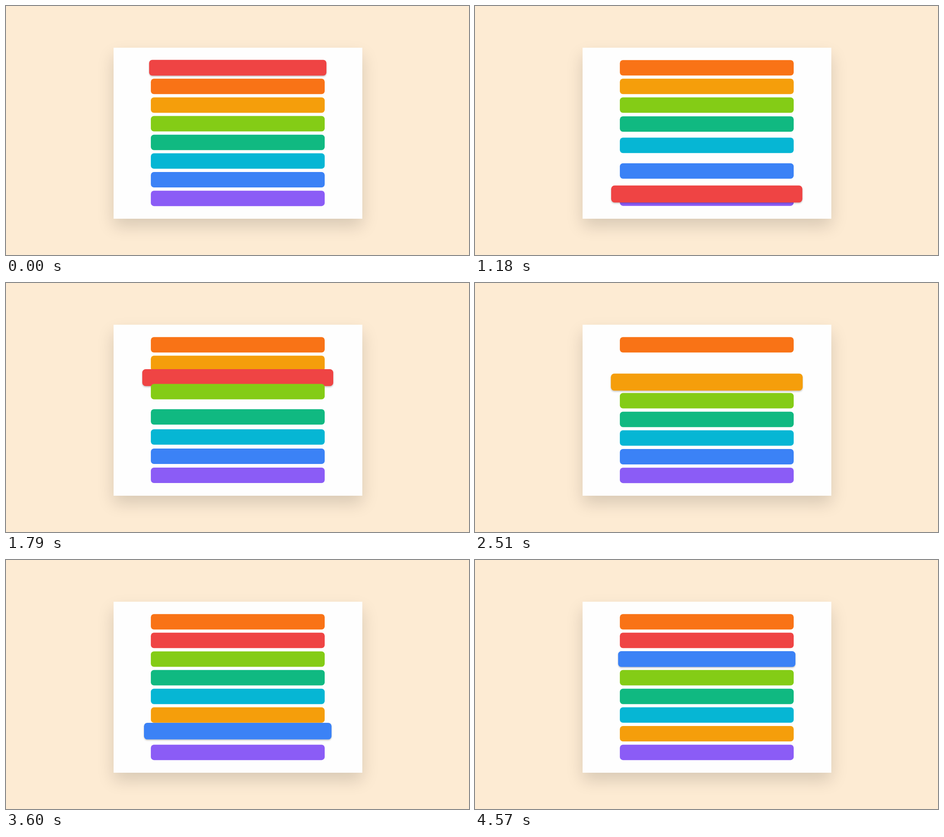
These frames come from a looping animation (1020 px wide and 549 px high, 4960 ms). An HTML page:

```html
<!DOCTYPE html>
<html lang="en">
<head>
<meta charset="utf-8">
<title>Reorder list</title>
<style>
  html, body { margin: 0; width: 100%; height: 100%; overflow: hidden; background: #fdebd3; }
  .card {
    position: absolute; left: 237px; top: 92px; width: 547.5px; height: 376.5px;
    background: #fefefe; box-shadow: 0 17.1px 34.3px rgba(0, 0, 0, .15);
  }
  .bar {
    position: absolute; left: 0; top: 0; width: 383.2px; height: 34.3px;
    border-radius: 6.9px;
  }
</style>
</head>
<body>
<div class="card"></div>
<script>
const LOOP = 4960, GLIDE = 450, HOVER_LEAD = 170;
const HOVER = .02, LIFT = .08;
const PITCH = 41.14, TOP = 136.3, CENTER_X = 510.7, BAR_W = 383.2, BAR_H = 34.3;
// A neighbour gives way once the held bar's edge passes its centre (in slots)
const SWAP_AT = 1 - BAR_H / PITCH / 2;
const COLORS = ['#ef4444', '#f97316', '#f59e0b', '#84cc16', '#10b981', '#06b6d4', '#3b82f6', '#8b5cf6'];

// path: key points of the pointer as [time, slot]
const drags = [
  { bar: 0, grab: 265, release: 1783, path: [
    [300, 0], [520, .58], [700, 2.01], [815, 3.6], [946, 4.58], [1180, 6.76],
    [1260, 7], [1340, 7], [1437, 5.42], [1544, 3.42], [1783, 1.76]] },
  { bar: 2, grab: 2370, release: 3040, path: [
    [2390, 1], [2510, 1.99], [2640, 3.58], [2860, 5.4]] },
  { bar: 6, grab: 3519, release: 3980, path: [
    [3540, 6], [3600, 5.865], [3705, 4.42], [3845, 2.42], [3950, 1.44]] }
];

// Underdamped unit step: stiffness 550, damping 30
function springStep(ms) {
  if (ms <= 0) return 0;
  const t = ms / 1000, decay = 15, freq = Math.sqrt(550 - decay * decay);
  return 1 - Math.exp(-decay * t) * (Math.cos(freq * t) + decay / freq * Math.sin(freq * t));
}

// Overdamped return: stiffness 200, damping 40; rests within 1px
function settle(offset, ms) {
  const t = ms / 1000, root = Math.sqrt(200), slow = 20 - root, fast = 20 + root;
  const left = offset * (fast * Math.exp(-slow * t) - slow * Math.exp(-fast * t)) / (fast - slow);
  return Math.abs(left) * PITCH < 1 ? 0 : left;
}

// cubic-bezier(.4, 0, .1, 1)
function ease(x) {
  if (x >= 1) return 1;
  let lo = 0, hi = 1;
  for (let i = 0; i < 24; i++) {
    const s = (lo + hi) / 2, r = 1 - s;
    if (1.2 * r * r * s + .3 * r * s * s + s ** 3 < x) lo = s; else hi = s;
  }
  return lo * lo * (3 - 2 * lo);
}

// Monotone cubic interpolation through the key points
function along(path, time) {
  const last = path.length - 1;
  const t = Math.max(path[0][0], Math.min(path[last][0], time));
  let i = 0;
  while (i < last - 1 && t >= path[i + 1][0]) i++;
  const secant = k => (path[k + 1][1] - path[k][1]) / (path[k + 1][0] - path[k][0]);
  const slope = k => {
    if (k === 0 || k === last) return 0;
    const a = secant(k - 1), b = secant(k);
    return a * b > 0 ? 2 * a * b / (a + b) : 0;
  };
  const [t0, y0] = path[i], [t1, y1] = path[i + 1];
  const h = t1 - t0, u = (t - t0) / h, v = 1 - u;
  return y0 * v * v * (1 + 2 * u) + y1 * u * u * (3 - 2 * u)
    + h * (slope(i) * u * v * v - slope(i + 1) * u * u * v);
}

const moves = COLORS.map((_, slot) => [{ at: -LOOP, pos: () => slot }]);
const orders = [{ at: 0, order: COLORS.map((_, i) => i) }];
const latest = (list, t) => list.findLast(entry => entry.at <= t);
const barSlot = (bar, t) => latest(moves[bar], t).pos(t);

function glide(bar, at, to) {
  const from = barSlot(bar, at);
  moves[bar].push({ at, pos: t => from + (to - from) * ease((t - at) / GLIDE) });
}

// Play each drag once to find when neighbours give way
for (const { bar, grab, release, path } of drags) {
  moves[bar].push({ at: grab, pos: t => along(path, t) });
  let order = orders.at(-1).order;
  for (let t = grab; t < release; t++) {
    const slot = order.indexOf(bar), offset = along(path, t) - slot;
    const next = slot + Math.sign(offset);
    if (Math.abs(offset) <= SWAP_AT || !(next in order)) continue;
    const other = order[next];
    order = order.slice();
    order[slot] = other;
    order[next] = bar;
    orders.push({ at: t, order });
    glide(other, t, slot);
  }
  const home = order.indexOf(bar), offset = along(path, release) - home;
  moves[bar].push({ at: release, pos: t => home + settle(offset, t - release) });
}

// The pointer rests on one bar until it reaches the next
function hoverStart(i) {
  if (i === 0) return -LOOP;
  return i < drags.length ? drags[i].grab - HOVER_LEAD : LOOP;
}

function barScale(bar, t) {
  const i = drags.findIndex(d => d.bar === bar);
  if (i < 0) return 1;
  const pulse = (from, to) => springStep(t - from) - springStep(t - to);
  return 1 + HOVER * pulse(hoverStart(i), hoverStart(i + 1))
    + LIFT * pulse(drags[i].grab, drags[i].release);
}

const bars = COLORS.map(color => {
  const el = document.createElement('div');
  el.className = 'bar';
  el.style.background = color;
  return document.body.appendChild(el);
});

function draw() {
  const t = performance.now() % LOOP;
  const { order } = latest(orders, t);
  const held = drags.find(d => t >= d.grab && t < d.release);
  bars.forEach((el, i) => {
    const scale = barScale(i, t);
    const shade = Math.max(0, Math.min(1, (scale - 1) / HOVER));
    const y = TOP + PITCH * barSlot(i, t) - BAR_H / 2;
    el.style.transform = `translate(${CENTER_X - BAR_W / 2}px, ${y}px) scale(${scale})`;
    el.style.boxShadow = shade > .01 ? `0 2px 3px rgba(0, 0, 0, ${.22 * shade})` : 'none';
    el.style.zIndex = held && held.bar === i ? bars.length + 1 : order.indexOf(i) + 1;
  });
  requestAnimationFrame(draw);
}
draw();
</script>
</body>
</html>
```
